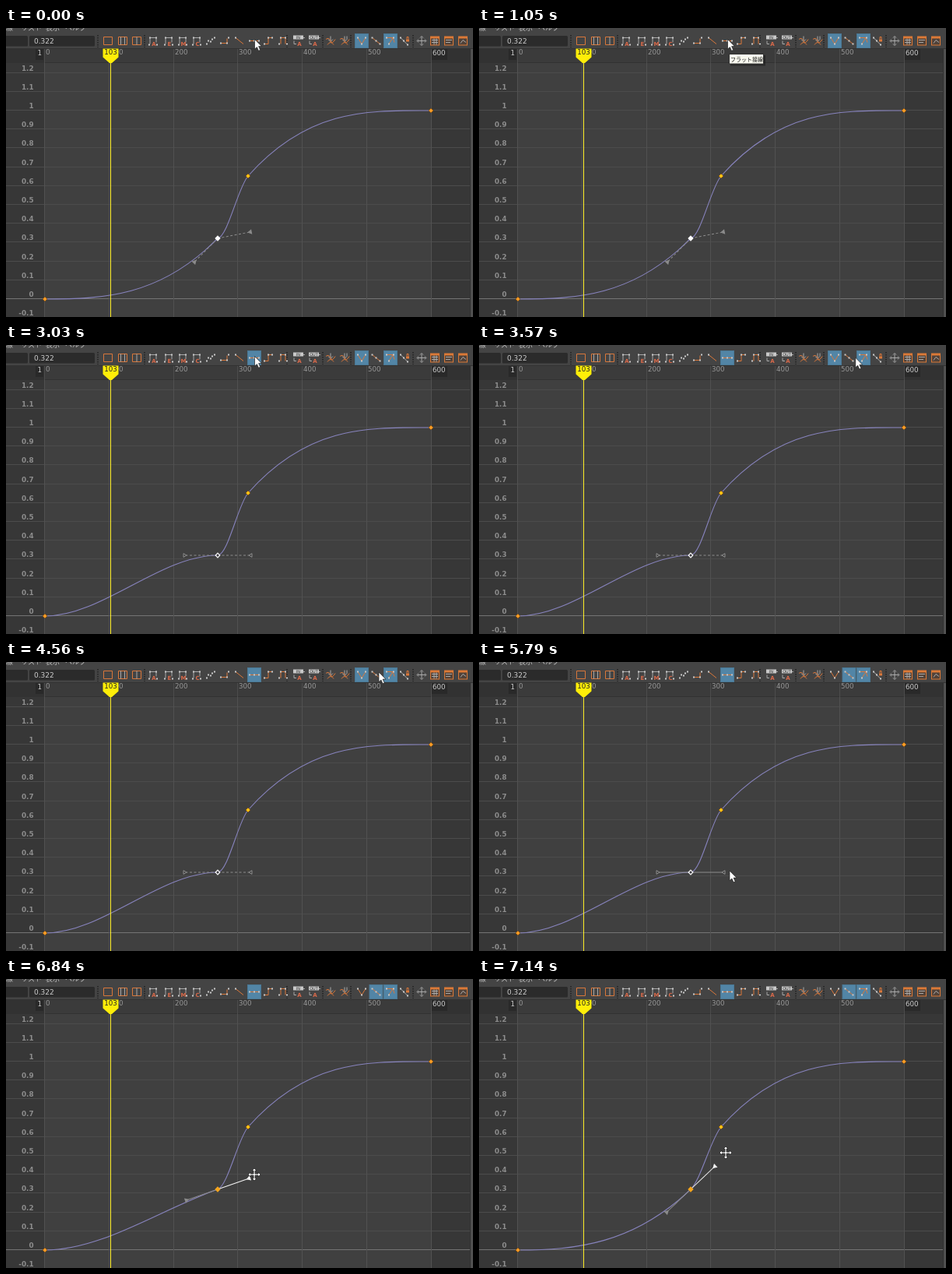
An HTML page for the animation above (7170 ms loop, 600 by 371 pixels).

```html
<!DOCTYPE html>
<html lang="ja">
<head>
<meta charset="utf-8">
<title>Graph editor tangents</title>
<style>
html, body { margin: 0; width: 100%; height: 100%; overflow: hidden; background: #404040; }
svg { display: block; width: 100vw; height: 100vh; }
text { font: 9px "DejaVu Sans", sans-serif; }
.jp { font-family: "Noto Sans CJK JP", "Noto Sans CJK", sans-serif; }
.axis { font-weight: bold; font-size: 8.8px; fill: #8c8c8c; text-anchor: end; }
.ruler { font-size: 8.7px; fill: #969696; }
.curve { fill: none; stroke: #8783bd; stroke-width: 1.1; }
.w { fill: none; stroke: #b4b4b4; stroke-width: .9; }
.o { fill: none; stroke: #d9773a; }
.dot { fill: #c8c8c8; }
.tag { font-size: 7px; font-weight: bold; fill: #d8694a; text-anchor: middle; }
</style>
</head>
<body>
<svg viewBox="0 0 600 371" preserveAspectRatio="none">
  <rect width="600" height="371" fill="#404040"/>
  <rect y="45" width="49" height="326" fill="#373737"/>
  <rect x="547" y="45" width="50" height="326" fill="#373737"/>
  <g id="grid"></g>
  <rect width="600" height="27" fill="#444"/>
  <rect y="27" width="600" height="18" fill="#3b3b3b"/>
  <rect y="27" width="49" height="18" fill="#323232"/>
  <rect x="547" y="27" width="50" height="18" fill="#323232"/>
  <path d="M0 26.5H600M0 44.5H600" stroke="#323232"/>
  <g id="ruler"></g>
  <path d="M596.5 27V371" stroke="#303030"/>
  <path d="M598.5 27V371" stroke="#505050" stroke-width="3"/>
  <g fill="#bbb">
    <text class="jp" x="-9" y="3">曲線</text><text class="jp" x="19" y="3">リスト</text>
    <text class="jp" x="51" y="3">表示</text><text class="jp" x="76" y="3">ヘルプ</text>
  </g>
  <rect x="-3" y="10" width="31" height="13.5" rx="1.5" fill="#2b2b2b"/>
  <rect x="30" y="10" width="84" height="13.5" rx="1.5" fill="#2b2b2b"/>
  <text x="36" y="20" fill="#ccc">0.322</text>
  <g id="buttons" fill="#5285a6" stroke="#4a7894"></g>
  <g id="icons"></g>
  <path class="curve" id="seg1"/>
  <path class="curve" id="seg2"/>
  <path class="curve" d="M311 190C389.3 102 467.7 106 546 106"/>
  <g id="inHandle"><path d="M0 0H41"/><path d="M44-2.4V2.4L40 0Z"/></g>
  <g id="outHandle"><path d="M0 0H41"/><path d="M44-2.4V2.4L40 0Z"/></g>
  <path d="M134.5 40V371" stroke="#fff02a"/>
  <path d="M124.5 26.5H144.5V37.5L136 45H133L124.5 37.5Z" fill="#ffee08"/>
  <text x="134.5" y="34" text-anchor="middle" fill="#222" style="font-size:8.7px">103</text>
  <g id="keys"></g>
  <path id="key" d="M0-2.8L2.8 0L0 2.8L-2.8 0Z" transform="translate(272 270)" stroke-width="1.2"/>
  <g id="tooltip">
    <rect x="323" y="35" width="45" height="13.5" fill="#000" opacity=".35"/>
    <rect x="321.5" y="33.5" width="44" height="12.5" fill="#fafaf0" stroke="#333"/>
    <text class="jp" x="323" y="42.8" fill="#111" style="font-size:7px;font-weight:500">フラット接線</text>
  </g>
  <path id="arrow" d="M0 0V12.6L2.9 10L5 14.8L7.2 13.8L5.1 9.1H8.9Z" fill="#fff" stroke="#222" stroke-width=".7"/>
  <path id="mover" d="M0-8L3-5H1V-1H5V-3L8 0L5 3V1H1V5H3L0 8L-3 5H-1V1H-5V3L-8 0L-5-3V-1H-1V-5H-3Z"
    fill="#fff" stroke="#222" stroke-width=".8"/>
</svg>
<script>
const LOOP = 7170, KEY = { x: 272, y: 270 };
const $ = id => document.getElementById(id);
const add = (id, markup) => $(id).insertAdjacentHTML('beforeend', markup);
const set = (id, attrs) => { for (const k in attrs) $(id).setAttribute(k, attrs[k]); };
const show = (id, on) => set(id, { opacity: +on });
const path = (cls, d) => `<path class="${cls}" d="${d}"/>`;
const dots = (...pts) => pts.map(([x, y]) => `<rect class="dot" x="${x - 1}" y="${y - 1}" width="2" height="2"/>`).join('');
const icon = (x, body) => add('icons', `<g transform="translate(${x} 16.5)">${body}</g>`);

function buildGraph() {
  for (let i = -1; i <= 12; i++) {
    const y = 348 - 24.2 * i;
    add('grid', `<path d="M0 ${Math.round(y) - .5}H597" stroke="${i ? '#4c4c4c' : '#747474'}"/>
      <text class="axis" x="35.6" y="${y - 3}">${i / 10}</text>`);
  }
  for (let i = 0; i <= 6; i++) {
    const x = Math.round(49 + 82.8 * i);
    add('grid', `<path d="M${x + .5} 45V371" stroke="#515151"/>`);
    if (i === 6) add('ruler', '<rect x="547" y="27" width="20" height="14" fill="#292929"/>');
    add('ruler', `<path d="M${x + .5} 27V45" stroke="#4c4c4c"/>
      <text class="ruler" x="${x + 2}" y="${i === 6 ? 35 : 34}" ${i === 6 ? 'style="fill:#ccc"' : ''}>${i * 100}</text>`);
  }
  add('ruler', '<rect x="38" y="27" width="10" height="14" fill="#292929"/><text class="ruler" x="40.5" y="35" style="fill:#ccc">1</text>');
  for (const [x, y, fill] of [[50, 348, '#f59b25'], [311, 190, '#ffc414'], [546, 106, '#f59b25']])
    add('keys', `<path d="M0-3L3 0L0 3L-3 0Z" transform="translate(${x} ${y})" fill="${fill}" stroke="#7a4a12" stroke-width=".7"/>`);
}

function buildToolbar() {
  for (const [id, x] of [['flat', 319], ['break', 457], ['unify', 475.5], ['free', 494]])
    add('buttons', `<rect id="${id}" x="${x - 8.5}" y="7.5" width="17" height="18"/>`);
  for (const x of [118, 178, 361, 407, 443, 523])
    add('icons', `<path d="M${x} 9V25" stroke="#292929" stroke-width="2" stroke-dasharray="1.5 1.5"/>`);

  const box = 'M-5.5-5H5.5V5H-5.5Z';
  icon(131, path('o', box));
  icon(150, path('o', box) + path('w', 'M-2.5-5V5M2.5-5V5'));
  icon(168, path('o', box) + path('w', 'M0-5V5'));
  [[189, 'A'], [209, 'E'], [227, 'M'], [245, 'C']].forEach(([x, c]) =>
    icon(x, path('w', 'M-4 4V-4H4V2') + dots([-5, 5], [-4, -4], [4, -4], [5, 5]) + `<text class="tag" x="1" y="6">${c}</text>`));
  icon(263, dots([-5, 4], [-3, 0], [0, 1], [2, -2], [5, -4]));
  icon(281, path('o', 'M-5 3H3V-3') + dots([-5, 3], [3, 3], [5, -4]));
  icon(300, path('o', 'M-5-4L5 4') + dots([-5, -4]));
  icon(319, path('o', 'M-5 0H5') + dots([-6, 0], [0, 0], [6, 0]));
  icon(337, path('o', 'M-4 4H0V-4H4') + dots([-5, 4], [0, -4], [5, -4]));
  icon(356, path('o', 'M-3 4V-4H3V4') + dots([-5, 4], [-3, -4], [3, -4], [5, 4]));
  [[376, 'IN'], [396, 'OUT']].forEach(([x, c]) =>
    icon(x, `<rect class="dot" x="-7" y="-7" width="13" height="5"/>
      <text x="-.5" y="-2.7" text-anchor="middle" fill="#333" style="font-size:5px">${c}</text>
      <text class="tag" x="1" y="6">A</text>` + path('w', 'M-6 0V4H-3M6-4H8')));
  [417, 435].forEach((x, i) => icon(x, path('w', 'M0-6V0M-3-2L0 1L3-2' + (i ? 'M3-6V-2' : '')) +
    path('o', 'M-6-2Q-2-5 0 0T6-2M-4 5Q0-1 4 5')));
  icon(457, path('o', 'M-5-4L0 4L5-4') + dots([-5, -4], [0, 4], [5, -4]));
  icon(475.5, path('o', 'M-5-4L5 4') + dots([-5, -4], [0, 0], [5, 4]));
  icon(494, path('o', 'M-5-4H3L-2 4M3-4L5 2') + dots([-5, -4], [4, -4], [-2, 4]));
  icon(512, path('w', 'M-5-4L4 5') + dots([-5, -4], [-1, 0], [4, 5]) +
    path('o', 'M3-2V-5H5V-2') + '<rect x="2" y="-2" width="4" height="3" fill="#d9773a"/>');
  icon(534, path('w', 'M0-5V5M-5 0H5M-2-4L0-6L2-4M-2 4L0 6L2 4M-4-2L-6 0L-4 2M4-2L6 0L4 2'));
  [551, 569, 587].forEach((x, i) => icon(x, '<rect x="-6" y="-6" width="12" height="12" fill="#db7937"/>' +
    '<rect x="-5" y="-3" width="10" height="8" fill="#514239"/>' +
    path('w', ['M-4-1H4M-4 2H4M-1-3V5M2-3V5', 'M-4-1H4M-4 2H2', 'M-3 3L0-1L4 2'][i])));
}

const cursorPath = [
  [0, 319.5, 14.5], [3030, 319.5, 14.5], [3300, 400, 25], [3600, 486, 16], [3720, 479, 13], [5490, 479, 13],
  [5790, 322, 268], [6180, 315, 268], [6690, 315, 268], [6900, 320, 247], [7140, 317, 223]
];
const clamp = v => Math.max(0, Math.min(1, v));

function cursorAt(t) {
  const i = cursorPath.findIndex(p => p[0] > t);
  if (i < 0) return cursorPath.at(-1).slice(1);
  const [t0, x0, y0] = cursorPath[i - 1], [t1, x1, y1] = cursorPath[i];
  const u = (t - t0) / (t1 - t0), e = u * u * (3 - 2 * u);
  return [x0 + (x1 - x0) * e, y0 + (y1 - y0) * e];
}

function drawHandle(id, angle, color, dashed, hollow) {
  set(id, {
    transform: `translate(${KEY.x} ${KEY.y}) rotate(${angle})`, stroke: color,
    'stroke-dasharray': dashed ? '3 2.5' : 'none', fill: hollow ? 'none' : color
  });
  $(id).lastElementChild.setAttribute('stroke-dasharray', 'none');
}

function render(t) {
  const [cx, cy] = cursorAt(t);
  const flat = t >= 2340, unified = t >= 4620, picked = t >= 6270, moving = t >= 6420, dragged = t > 6690;
  let inAngle = 45.5, outAngle = 11;
  if (flat) inAngle = outAngle = 0;
  if (dragged) {
    const lift = Math.atan2(KEY.y - cy, cx - KEY.x) * 180 / Math.PI - 2.7;
    inAngle = outAngle = Math.max(0, lift);
  }
  const slope = a => Math.tan(a * Math.PI / 180);
  set('seg1', { d: `M50 348C124 348 198 ${KEY.y + 74 * slope(inAngle)} 272 270` });
  set('seg2', { d: `M272 270C285 ${KEY.y - 13 * slope(outAngle)} 298 205 311 190` });

  const hollow = flat && !dragged;
  drawHandle('inHandle', 180 - inAngle, '#8c8c8c', !unified, hollow);
  drawHandle('outHandle', -outAngle, picked ? '#f4f4f4' : '#8c8c8c', !unified, hollow);
  const keyColor = picked ? '#f5a51d' : '#fff';
  set('key', { fill: hollow ? '#403f45' : keyColor, stroke: keyColor });

  show('flat', flat);
  show('break', !unified);
  show('unify', unified);
  set('tooltip', { opacity: t < 2190 ? clamp((t - 810) / 240) : 0 });
  show('arrow', !moving);
  show('mover', moving);
  set(moving ? 'mover' : 'arrow', { transform: `translate(${cx} ${cy})` });
}

buildGraph();
buildToolbar();
const start = performance.now();
function tick() {
  render((performance.now() - start) % LOOP);
  requestAnimationFrame(tick);
}
tick();
</script>
</body>
</html>
```
